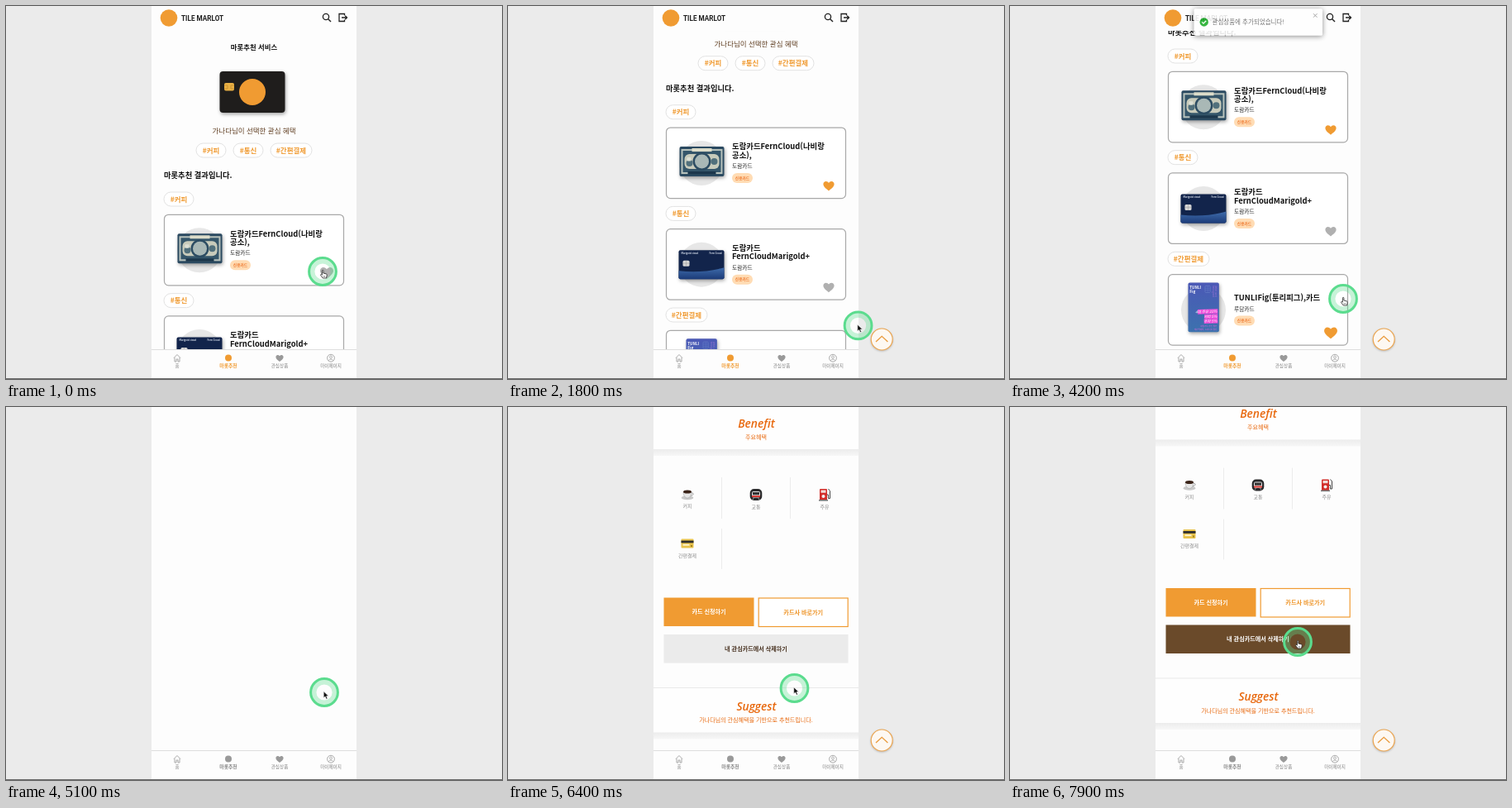
Recreate the animation shown at these times as an HTML page. Size 600 by 451 pixels, loop 8000 ms.

```html
<!DOCTYPE html>
<html lang="ko">
<head>
<meta charset="utf-8">
<title>Card picks</title>
<style>
html, body { margin: 0; width: 100%; height: 100%; overflow: hidden; background: #ebebeb; }
svg { display: block; width: 100vw; height: 100vh; font-family: "Noto Sans CJK KR", "Noto Sans", sans-serif; }
.soft { filter: drop-shadow(1px 2px 2px rgba(0,0,0,.35)); }
.deep { filter: drop-shadow(0 5px 8px rgba(0,0,0,.3)); }
</style>
</head>
<body>
<svg id="stage" viewBox="0 0 600 451" xmlns="http://www.w3.org/2000/svg"></svg>
<script>
const ORANGE = '#f09b32', DEEP = '#e8690f', GREY = '#a9a9a9', LOOP = 8000;
const HEART = 'M0 5.8C-3 3.3-6.6.7-6.6-2.2C-6.6-4.3-5.1-5.7-3.3-5.7C-1.9-5.7-.6-4.9 0-3.8C.6-4.9 1.9-5.7 3.3-5.7C5.1-5.7 6.6-4.3 6.6-2.2C6.6.7 3 3.3 0 5.8Z';

// Text is placed by its vertical centre.
const text = (x, y, s, size, fill = '#111', weight = 400, anchor = 'start', extra = '') =>
  `<text x="${x}" y="${(y + size * .36).toFixed(2)}" font-size="${size}" fill="${fill}" font-weight="${weight}" text-anchor="${anchor}" ${extra}>${s}</text>`;
const mid = (x, y, s, size, fill, weight, extra) => text(x, y, s, size, fill, weight, 'middle', extra);
const rect = (x, y, w, h, fill, extra = '') =>
  `<rect x="${x}" y="${y}" width="${w}" height="${h}" fill="${fill}" ${extra}/>`;
const circle = (x, y, r, fill, extra = '') => `<circle cx="${x}" cy="${y}" r="${r}" fill="${fill}" ${extra}/>`;
const line = (d, stroke, width = 1, extra = '') =>
  `<path d="${d}" fill="none" stroke="${stroke}" stroke-width="${width}" ${extra}/>`;
const group = (id, body, extra = '') => `<g id="${id}" ${extra}>${body}</g>`;
const at = (x, y, body, scale = 1) => `<g transform="translate(${x} ${y}) scale(${scale})">${body}</g>`;

const chip = (x, y, w, s) =>
  rect(x, y - 8.5, w, 17, '#fff', 'rx="8.5" stroke="#e2e2e2"') + mid(x + w / 2, y, s, 8.5, ORANGE, 700);
const badge = (x, y) =>
  rect(x, y - 6, 25, 12, '#ffdcb4', 'rx="6"') + mid(x + 12.5, y, '신용카드', 4.7, '#ee762a', 700);

function billCard() {
  return `<g class="soft">${rect(0, 0, 54, 36, '#2b4a61', 'rx="2"')}</g>` +
    rect(2, 3, 50, 30, '#b9c3bd') + rect(4, 5, 46, 26, '#35566a') +
    rect(6, 9, 42, 18, '#c8cbbb', 'rx="6"') + rect(15, 2, 24, 4, '#dcdcc9') +
    circle(27, 18, 11, '#2c4c62') + circle(27, 18, 8.5, '#a9b8b6') +
    circle(12, 20, 4, '#51707c') + circle(42, 18, 4, '#51707c') +
    rect(9, 13, 5, 4.5, '#dde0d6', 'rx="1"') + rect(10, 30, 34, 3.5, '#1c374c');
}
function navyCard() {
  return `<g class="soft">${rect(0, 0, 55, 35, '#12244b', 'rx="2"')}</g>` +
    '<path d="M0 25C18 27 38 26 55 21V33a2 2 0 0 1-2 2H2a2 2 0 0 1-2-2Z" fill="url(#wave)"/>' +
    rect(5, 12.5, 8, 7, '#d5d5d5', 'rx="1.5"') + line('M5 16h8M9 12.5v7', '#9a9a9a', .5) +
    text(3, 3.7, 'Marigold cloud', 2.8, '#dfe6f2', 700) + text(52, 3.7, 'Fern Cloud', 2.8, '#dfe6f2', 700, 'end');
}
function tallCard() {
  const pink = (x, y, s) => `<g transform="rotate(-2 ${x} ${y})">` +
    rect(x, y - 5.6, 71 - x, 11, '#ef4fdc') + text(69, y, s, 8.8, '#fff', 500, 'end', 'font-style="italic"') + '</g>';
  return rect(0, 0, 74, 118, 'url(#blue)', 'rx="4"') +
    text(3.5, 11, 'TUNLI', 9, '#fff', 700) + text(3.5, 21, 'Fig', 9.5, '#fff', 700) +
    rect(40.5, 7.5, 12.5, 16, 'none', 'rx="2" stroke="#6c86cb"') + line('M40.5 13h12.5M40.5 18h12.5M47 7.5v16', '#6c86cb', .7) +
    at(62, 7, `<g transform="rotate(90)">${text(0, -4, 'debit card', 5.5, '#a878d8')}${text(0, 2, 'hello good', 5.5, '#a878d8')}</g>`) +
    pink(23, 70, '4대 주유 10%') + pink(39, 81.5, '커피 5%') + pink(38, 92.5, '주차 5%') +
    text(69, 104.5, '매일가득 경유 할인', 5, '#d765dc', 500, 'end') +
    text(69, 111.5, '캐쉬백혜택, 드라이브 할인', 5, '#d765dc', 500, 'end');
}

const cardTop = i => 252.3 + 122.65 * i;
function product(i, tag, tagW, titles, maker, art) {
  const y = cardTop(i), shift = titles.length > 1 ? 5 : 0;
  return chip(191, y - 18.8, tagW, tag) +
    rect(191.5, y, 217, 85.5, '#fff', 'rx="5" stroke="#a8a8a8" stroke-width="1.2"') +
    circle(234, y + 43, 27, '#e7e7e7') + art(y) +
    titles.map((s, k) => text(271, y + 28 - shift + 10.2 * k, s, 9.4, '#111', 700)).join('') +
    text(271, y + 41.6 + shift, maker, 6.7, '#222', 500) + badge(271, y + 56 + shift) +
    `<path id="heart${i}" d="${HEART}" fill="#b0b0b0"/>`;
}

function listPage() {
  return mid(300, 49.5, '마롯추천 서비스', 8.4, '#111', 700) +
    `<g class="soft">${rect(258.5, 79, 79, 50, '#1f1d1c', 'rx="4"')}</g>` +
    rect(264, 93, 12, 9.5, '#e9b045', 'rx="2"') + line('M264 96h4v4h-4M276 96h-4v4h4', '#b98223', .6) +
    circle(298, 104, 16, ORANGE) +
    mid(300, 151, '가나다님이 선택한 관심 혜택', 8.5, '#5f3d20', 500) +
    chip(230, 174.5, 36, '#커피') + chip(275, 174.5, 36, '#통신') + chip(320, 174.5, 50, '#간편결제') +
    text(191, 205, '마롯추천 결과입니다.', 9.3, '#111', 700) +
    product(0, '#커피', 36, ['도람카드FernCloud(나비랑', '공소),'], '도람카드', y => at(207.5, y + 23, billCard())) +
    product(1, '#통신', 36, ['도람카드', 'FernCloudMarigold+'], '도람카드', y => at(206.5, y + 25.5, navyCard())) +
    product(2, '#간편결제', 50, ['TUNLIFig(툰리피그),카드'], '루담카드', y => `<g class="soft">${at(215.5, y + 10, tallCard(), .505)}</g>`);
}

function header() {
  return rect(176, 0, 248, 30, '#fdfdfd') + circle(197, 14.5, 10.3, ORANGE) +
    text(212, 15.5, 'TILE MARLOT', 8.2, '#222', 700, 'start', 'font-family="Roboto, sans-serif"') +
    circle(387, 13, 3.6, 'none', 'stroke="#222" stroke-width="1.3"') + line('M389.7 15.7L393 19', '#222', 1.4) +
    line('M409.5 11.5V9.5H403V18.5H409.5V16.5M406 14H412.5M410.3 11.8L412.5 14L410.3 16.2', '#222', 1.3);
}

const icons = {
  coffee: '<ellipse cx="0" cy="4.2" rx="7.3" ry="2.6" fill="#c9c9c9"/><path d="M-5-3C-5 7 5 7 5-3Z" fill="#e6e6e6" stroke="#999" stroke-width=".5"/><ellipse cx="0" cy="-3" rx="5" ry="2" fill="#3a2318"/>' + line('M5-1.5c3-.5 3 3-1 3', '#999', 1),
  metro: rect(-7.3, -7, 14.6, 14, '#2a2a2c', 'rx="5"') + rect(-5, -4, 10, 7.5, '#e5e5e5', 'rx="2"') +
    rect(-4, -3, 8, 3.2, '#333') + rect(-5, 1, 10, 2, '#d93a35') + line('M-4 6L-2.5 3.5M4 6L2.5 3.5', '#aaa', .8),
  fuel: rect(-6, -7, 9, 14, '#d22e2a', 'rx="1"') + rect(-4.5, -5.5, 6, 3.2, '#f2dcd8') + circle(-1.5, 2, 2, '#f4f4f4') +
    line('M3 0h1.5v4.5h2v-9L4.5-7', '#444', 1) + rect(-7, 6, 11, 1.6, '#777'),
  pay: rect(-7.5, -5.5, 15, 11, '#e8c34c', 'rx="1"') + rect(-7.5, -3.5, 15, 2.8, '#2d2d2d') + rect(-5.5, .8, 8, 1.8, '#fff6d5') + rect(4, 2, 2, 2, '#a58422')
};
const perk = (x, y, icon, s) => at(x, y, icons[icon]) + mid(x, y + 14.8, s, 6, '#8d8d8d');
const button = (x, y, w, s, fill, ink, extra = '') =>
  rect(x, y, w, 34.5, fill, extra) + mid(x + w / 2, y + 17.2, s, 7.1, ink, 700);
function banner(y, head, sub) {
  return rect(176, y, 248, 54, '#fefefe') + line(`M176 ${y}h248`, '#e9e9e9') +
    rect(176, y + 54, 248, 8, 'url(#band)') +
    mid(300.5, y + 22.5, head, 13.8, DEEP, 600, 'font-style="italic" font-family="Open Sans, Noto Sans, sans-serif"') +
    mid(300, y + 39, sub, 7.05, DEEP, 500);
}
function detailPage() {
  const fact = (y, a, n, b) => mid(300, y, `${a} <tspan font-size="9" font-weight="700">${n}</tspan> ${b}`, 6, '#222', 500);
  return rect(176, 0, 248, 78, '#eeeeee') + line('M197.5 11L193.5 15L197.5 19', '#999', 1.2) +
    `<g class="deep">${at(263, 33.5, tallCard())}</g>` +
    badge(287.5, 178.5) + mid(300, 194, 'TUNLIFig(툰리피그),카드', 9.4, '#111', 700) +
    mid(300, 207, '루담카드', 6.6, '#222', 500) +
    fact(230.5, '전월실적', '40', '만원 이상') + fact(244.5, '연회비', '15,000', '원') +
    banner(264, 'Benefit', '주요혜택') +
    line('M258.5 352v50M341.5 352v50M258.5 414v49', '#ececec') +
    perk(217, 372.5, 'coffee', '커피') + perk(300, 373, 'metro', '교통') +
    perk(383, 373, 'fuel', '주유') + perk(217, 432, 'pay', '간편결제') +
    button(188.5, 497.5, 109, '카드 신청하기', ORANGE, '#fff') +
    button(303.2, 498, 108, '카드사 바로가기', '#fff', '#ee9427', `stroke="${ORANGE}" stroke-width="1.2"`) +
    group('remove', button(188.5, 542, 223, '내 관심카드에서 삭제하기', '#ebebeb', '#4a3423')) +
    banner(606.5, 'Suggest', '가나다님의 관심혜택을 기반으로 추천드립니다.');
}

function navBar() {
  const label = (x, s) => mid(x, 435.3, s, 5.6, '#858585', 500);
  return rect(176, 415.5, 248, 35, '#fdfdfd') + line('M176 415.5h248', '#dedede') +
    line('M203 425.5L207 421.5L211 425.5M204 425V430H206V427H208V430H210V425', GREY, 1) + label(207, '홈') +
    group('tab', circle(269, 425.5, 4) + mid(269, 435.3, '마롯추천', 5.8, 'inherit', 700).replace('fill="inherit"', '')) .replace('fill="undefined"', '') +
    at(331, 426, `<path d="${HEART}" fill="#999"/>`, .7) + label(331, '관심상품') +
    circle(393, 425.7, 4.4, 'none', `stroke="${GREY}"`) + circle(393, 424.5, 1.5, 'none', `stroke="${GREY}" stroke-width=".9"`) +
    line('M390.2 428.8C391 426.6 395 426.6 395.8 428.8', GREY, .9) + label(393, '마이페이지');
}

function toast() {
  return `<g style="filter:drop-shadow(0 1px 3px rgba(0,0,0,.5))">${rect(222.5, 8, 155.5, 32.5, '#fff', 'rx="1.5"')}</g>` +
    circle(234.7, 24.2, 5.2, '#1fae2b') + line('M232.2 24.2L234 26L237.3 22.5', '#fff', 1.2) +
    text(244.5, 23.8, '관심상품에 추가되었습니다!', 7.5, '#666') +
    line('M367 14L371.5 18.5M371.5 14L367 18.5', '#999', 1);
}

function pointer() {
  return circle(0, 0, 12.6, 'none', 'stroke="#5edc90" stroke-opacity=".35" stroke-width="6"') +
    circle(0, 0, 16.4, 'none', 'stroke="#5bdc8e" stroke-width="3"') +
    group('arrow', '<path d="M-.8-1.2V6.8L1.1 5.1L2.5 8.2L4 7.5L2.6 4.6H5.2Z" fill="#111" stroke="#fff" stroke-width=".6"/>') +
    group('hand', '<path d="M-.6-.8C-.6-2 .9-2 .9-.8V2L4.4 2.9C5.2 3.2 5.3 4 5.1 5L4.5 8H.2L-2.4 4.5C-2.8 3.5-1.6 3-.6 4.2Z" fill="#fff" stroke="#222" stroke-width=".8"/>' +
      line('M1 5v2M2.5 5v2', '#444', .5));
}

const fade = (id, a, b) => `<linearGradient id="${id}" x2="0" y2="1"><stop stop-color="${a}"/><stop offset="1" stop-color="${b}"/></linearGradient>`;
const stage = document.getElementById('stage');
stage.innerHTML =
  `<defs>${fade('blue', '#4b58b6', '#3c72ae')}${fade('wave', '#3f6cab', '#1b3b78')}${fade('band', '#ececec', '#f7f7f7')}</defs>` +
  rect(0, 0, 600, 451, '#ebebeb') + rect(176, 0, 248, 451, '#fdfdfd') +
  group('list', group('listBody', listPage()) + header()) +
  group('detail', detailPage()) + navBar() +
  group('up', `<g style="filter:drop-shadow(0 1px 1px rgba(0,0,0,.2))">${circle(452.2, 403, 13, '#fdf8f2', 'stroke="#eba550" stroke-width="1.2"')}</g>` +
    line('M445 406L452.2 399.3L459.4 406', '#e99a3c', 1.3)) +
  group('toast', toast()) + group('pointer', pointer()) +
  rect(0, 450, 600, 1, '#6a6a6a');

const el = {};
stage.querySelectorAll('[id]').forEach(n => el[n.id] = n);
const [removeBox, removeText] = el.remove.children;

const span = (t, a, b) => Math.min(1, Math.max(0, (t - a) / (b - a)));
const smooth = p => p * p * (3 - 2 * p);
const easeOut = p => 1 - (1 - p) ** 3;
const blend = (a, b, p) => `rgb(${a.map((v, i) => Math.round(v + (b[i] - v) * p))})`;
const show = (node, on) => node.setAttribute('visibility', on ? 'visible' : 'hidden');
const move = (node, x, y, s = 1) => node.setAttribute('transform', `translate(${x} ${y}) scale(${s})`);

// Pointer stops: time, x, y
const route = [
  [0, 383, 321], [600, 383, 321], [900, 416, 334], [1300, 424.5, 340], [1750, 424, 385], [2000, 420, 398],
  [2450, 389, 397], [4050, 389, 397], [4200, 403, 354], [4500, 385, 345], [5300, 385, 345], [5900, 346.5, 340],
  [6500, 346.5, 340], [7000, 372, 313.5], [7300, 372, 313.5], [7700, 350, 286], [7900, 348, 284]
];
function pointerAt(t) {
  const k = route.findIndex(p => p[0] > t);
  if (k < 0) return route[route.length - 1].slice(1);
  const [a, b] = [route[k - 1], route[k]], p = smooth(span(t, a[0], b[0]));
  return [a[1] + (b[1] - a[1]) * p, a[2] + (b[2] - a[2]) * p];
}

function setHeart(i, liked, hover) {
  el['heart' + i].setAttribute('fill', liked ? ORANGE : '#b0b0b0');
  move(el['heart' + i], 388, cardTop(i) + 70.7, 1 + .22 * hover);
}

function draw(t) {
  const onList = t < 4750, onDetail = t >= 5150;
  show(el.list, onList);
  show(el.detail, onDetail);
  el.tab.setAttribute('fill', onList ? ORANGE : '#858585');
  el.tab.firstChild.setAttribute('fill', onList ? ORANGE : '#999');

  move(el.listBody, 0, -173 * smooth(span(t, 1400, 2100)));
  setHeart(0, t >= 200, 1 - smooth(span(t, 650, 900)));
  setHeart(1, false, 0);
  setHeart(2, t >= 2850, smooth(span(t, 2300, 2550)) - smooth(span(t, 4150, 4450)));

  move(el.detail, 0, -278 * easeOut(span(t, 5920, 6650)) - .5 * span(t, 7000, 7500));
  const hover = span(t, 7580, 7800);
  removeBox.setAttribute('fill', blend([235, 235, 235], [106, 74, 42], hover));
  removeText.setAttribute('fill', blend([74, 52, 35], [255, 255, 255], hover));

  const upShown = onList ? span(t, 1500, 1750) : onDetail ? span(t, 6050, 6300) : 0;
  el.up.setAttribute('opacity', upShown);

  const [inAt, outAt] = t < 2600 ? [400, 1500] : [3000, 4100];
  const rise = 1 - easeOut(span(t, inAt, inAt + 300)), leave = span(t, outAt, outAt + 300) ** 2;
  move(el.toast, 0, -42 * (rise + leave));
  el.toast.setAttribute('opacity', Math.max(0, 1 - rise - leave));

  const [x, y] = pointerAt(t), hand = onList ? x < 409 : t > 7560;
  move(el.pointer, x, y);
  show(el.hand, hand);
  show(el.arrow, !hand);
}

function tick(now) {
  draw(now % LOOP);
  requestAnimationFrame(tick);
}
draw(0);
requestAnimationFrame(tick);
</script>
</body>
</html>
```
